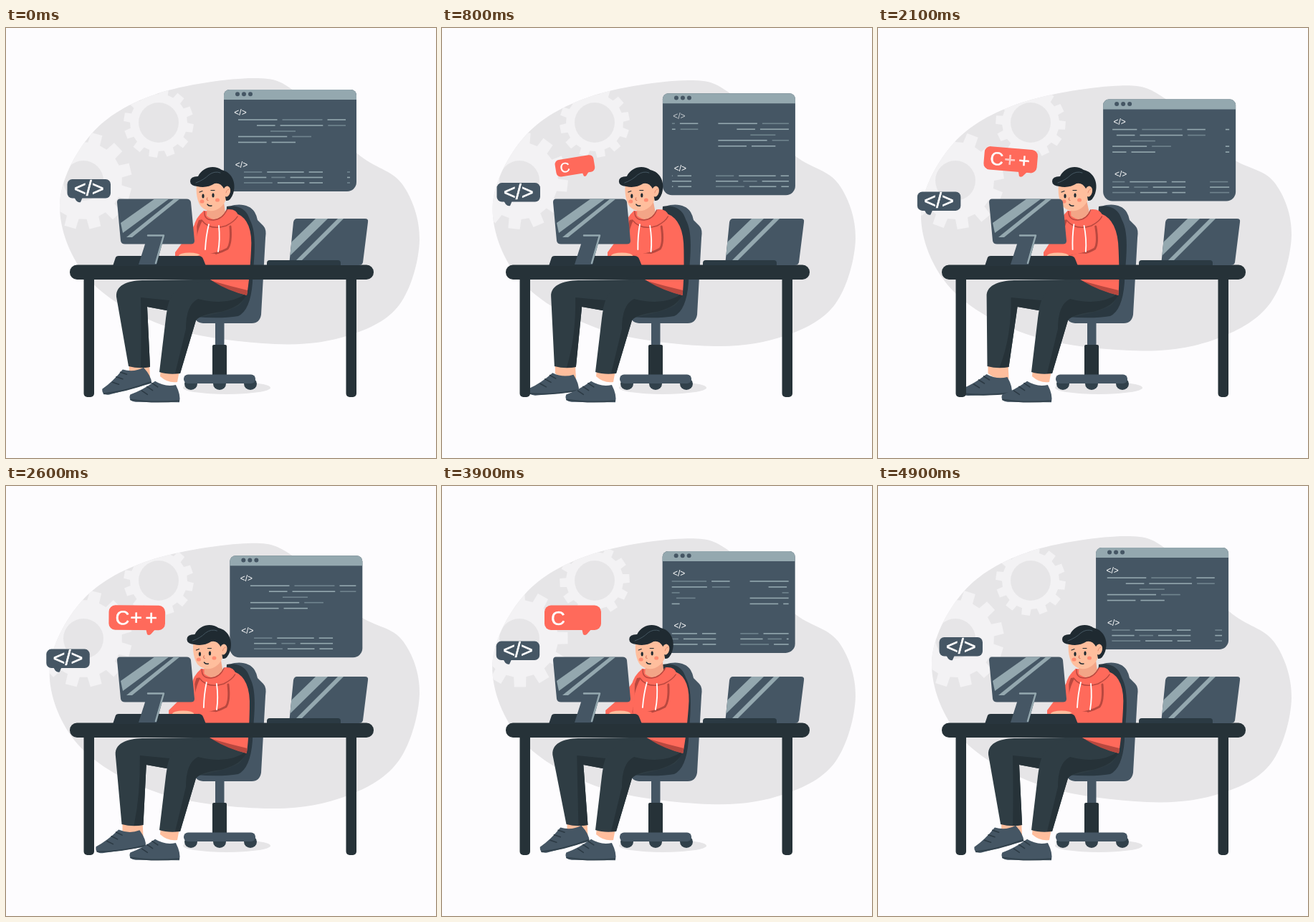
An HTML page with a canvas that plays this animation: 600 by 600 pixels, repeating every 5 s.

```html
<!DOCTYPE html>
<html lang="en">
<head>
<meta charset="utf-8">
<title>Developer at a desk</title>
<style>
html, body { margin: 0; width: 100%; height: 100%; overflow: hidden; background: #fdfcfe; }
canvas { display: block; width: 600px; height: 600px; }
</style>
</head>
<body>
<canvas id="stage" width="600" height="600"></canvas>
<script>
const ctx = document.getElementById('stage').getContext('2d');
const LOOP = 5000, STEP = 100;
const BG = '#fdfcfe', BLOB = '#e6e5e7', GEAR = '#f3f2f4';
const SLATE = '#455664', DARK = '#263238', MID = '#2f3d44', PALE = '#94a8af';
const RED = '#ff6a5b', RED_DARK = '#b9483f', SKIN = '#ffbe9d', HAIR = '#1f2a31';
const FONT = '"Liberation Sans", Arial, sans-serif';

// Progress from 0 at time a to 1 at time b.
const ramp = (t, a, b) => Math.min(1, Math.max(0, (t - a) / (b - a)));
const ease = k => (1 - Math.cos(Math.PI * k)) / 2;
const drift = t => ease(ramp(t, 0, 2200)) - ease(ramp(t, 2200, 4950));

function fill(d, color) {
  ctx.fillStyle = color;
  ctx.fill(typeof d === 'string' ? new Path2D(d) : d);
}

function line(d, color, width) {
  ctx.strokeStyle = color;
  ctx.lineWidth = width;
  ctx.lineCap = ctx.lineJoin = 'round';
  ctx.stroke(new Path2D(d));
}

function box(x, y, w, h, r, color) {
  ctx.beginPath();
  ctx.roundRect(x, y, w, h, r);
  ctx.fillStyle = color;
  ctx.fill();
}

function oval(x, y, rx, ry, color, turn = 0) {
  ctx.beginPath();
  ctx.ellipse(x, y, rx, ry, turn, 0, 7);
  ctx.fillStyle = color;
  ctx.fill();
}

function group(draw) {
  ctx.save();
  draw();
  ctx.restore();
}

function text(s, x, y, size, alpha = 1, weight = 0) {
  group(() => {
    ctx.globalAlpha = alpha;
    ctx.font = `${size}px ${FONT}`;
    ctx.textAlign = 'center';
    ctx.fillStyle = ctx.strokeStyle = '#fff';
    ctx.lineWidth = weight;
    ctx.fillText(s, x, y);
    if (weight) ctx.strokeText(s, x, y);
  });
}

// Closed smooth curve through a few points.
function smooth(points) {
  const path = new Path2D(), n = points.length;
  const at = i => points[(i + n) % n];
  path.moveTo(...at(0));
  for (let i = 0; i < n; i++) {
    const [a, b, c, d] = [at(i - 1), at(i), at(i + 1), at(i + 2)];
    path.bezierCurveTo(
      b[0] + (c[0] - a[0]) / 6, b[1] + (c[1] - a[1]) / 6,
      c[0] - (d[0] - b[0]) / 6, c[1] - (d[1] - b[1]) / 6, c[0], c[1]);
  }
  return path;
}

const EDGE = [[345, 70], [408, 92], [490, 175], [553, 218], [577, 296], [549, 386],
  [478, 429], [375, 441], [225, 417], [115, 350], [75, 247], [119, 148], [210, 92]];

function gear(cx, cy, outer, inner, hole, degrees) {
  const path = new Path2D(), pitch = Math.PI / 6;
  for (let i = 0; i < 12; i++) {
    const a = degrees * Math.PI / 180 + i * pitch;
    for (const [da, r] of [[-.16, inner], [-.12, outer], [.12, outer], [.16, inner]]) {
      path.lineTo(cx + r * Math.cos(a + da), cy + r * Math.sin(a + da));
    }
  }
  path.closePath();
  path.moveTo(cx + hole, cy);
  path.arc(cx, cy, hole, 0, 7);
  ctx.fillStyle = GEAR;
  ctx.fill(path, 'evenodd');
}

function backdrop(t) {
  const k = drift(t), turn = 60 * t / LOOP;
  const blob = smooth(EDGE.map(([x, y]) =>
    [x - k * .03 * (577 - x), y + k * 13 * (1 - (x / 520) ** 4)]));
  fill(blob, BLOB);
  group(() => {
    ctx.clip(blob);
    gear(213, 132, 49, 40, 28, turn + 9.5);
    gear(108, 213, 68, 54, 28, 16 - turn);
  });
}

// One row of code: bars of seeded length between two ends.
function codeRow(y, from, to, bars, shift, period) {
  const gap = 7, room = to - from - gap * (bars - 1);
  const size = i => 1 + .5 * Math.sin(y * 3 + i * 2.4);
  let total = 0, x = from;
  for (let i = 0; i < bars; i++) total += size(i);
  for (let i = 0; i < bars; i++) {
    const w = room * size(i) / total;
    ctx.fillStyle = (i + Math.round(y)) % 3 === 1 ? '#70848e' : PALE;
    for (let n = -2; n < 2; n++) ctx.fillRect(x + shift + n * period, y - .8, w, 1.6);
    x += w + gap;
  }
}

function codeWindow(t) {
  const k = ramp(t, 0, 2080) - ramp(t, 2080, 4920);
  group(() => {
    ctx.translate(304 + 10.2 * k, 86 + 13.7 * k);
    box(0, 0, 185, 142, [8, 8, 13, 13], SLATE);
    box(0, 0, 185, 14, [8, 8, 0, 0], PALE);
    for (let i = 0; i < 3; i++) oval(19 + 9 * i, 6.3, 3, 3, SLATE);
    text('</>', 23, 35.5, 12, 1 - .4 * (ramp(t, 0, 400) - ramp(t, 400, 2100)));
    text('</>', 24.5, 108.5, 12);
    ctx.beginPath();
    ctx.rect(13, 20, 163, 120);
    ctx.clip();
    const top = (...row) => codeRow(...row, t * 356 / 4960 % 178, 178);
    top(42, 20, 170, 3);
    top(50, 46, 170, 3);
    top(58, 65, 100, 1);
    top(65.5, 20, 122, 2);
    top(73.5, 20, 100, 2);
    for (let i = 0; i < 3; i++) {
      codeRow(115 + 7.5 * i, 28, 138, 3, t * 288 / LOOP % 144, 144);
    }
  });
}

function tagBubble(t) {
  const k = drift(t);
  group(() => {
    ctx.translate(-30.8 * k, 17.5 * k);
    box(85.5, 211, 60.5, 26.5, 7, SLATE);
    fill('M95 236 L98 241 Q101 244 104 243 L107 236 Z', SLATE);
    text('</>', 115.7, 233.5, 29, 1, .6);
  });
}

function langBubble(t) {
  const size = ramp(t, 390, 1050) - ramp(t, 4200, 4600);
  if (!size) return;
  // Fading swing after the pop-in.
  const swing = Math.cos(Math.PI * ramp(t, 1300, 3100) * 2) * (1 - ramp(t, 1300, 3100));
  group(() => {
    ctx.translate(199, 205);
    ctx.rotate(-.16 * swing);
    ctx.scale(size * (1 + .11 * swing), size * (1 + .11 * swing));
    ctx.translate(-199, -205);
    box(143, 166.5, 79, 34.5, 9, RED);
    fill('M195 199 L197 207 Q199 209 202 207 L209 199 Z', RED);
    text('C', 162, 193.5, 27.5, 1, .5);
    text('+', 181.5, 193.5, 29, ramp(t, 1600, 2400) - ramp(t, 3300, 3700), .5);
    text('+', 202.5, 193.5, 29, ramp(t, 1100, 1700) - ramp(t, 2800, 3300), .5);
  });
}

function chair() {
  oval(308, 502, 61, 9, BLOB);
  fill('M312 249 C326 244 341 247 347 257 Q350 262 351 268 L359 276 Q364 281 362 293 L356 400 Q354 412 343 412 L275 412 Q262 410 265 402 Z', SLATE);
  fill('M308 249 C329 246 337 257 340 267 C352 288 345 328 344 355 Q341 394 324 402 Q300 406 264 403 L300 370 Z', '#2a3841');
  box(292, 411, 12.5, 36, 0, SLATE);
  box(288, 442, 20, 45, 2, DARK);
  for (const x of [258, 298, 341]) oval(x, 496.5, 9, 8.5, '#31414b');
  box(248, 483.5, 100, 12.5, 6, SLATE);
}

// Shoe with its toe tip at the given point.
function shoe(x, y, turn) {
  group(() => {
    ctx.translate(x, y);
    ctx.rotate(turn);
    fill('M32 -28 Q46 -20 61 -24 Q69 -10 67 0 L6 2 Q-5 1 -2 -8 Q14 -14 32 -28 Z', SLATE);
    line('M-1 -1 Q30 3 66 -2', '#33434e', 2);
    line('M21 -20 L29 -15 M28 -25 L36 -20 M14 -14 L22 -9', '#2c3a44', 1.5);
  });
}

function legs(t) {
  const foot = -18.5 * ramp(t, 0, 1050) + 21 * ramp(t, 2300, 3000) - 2.5 * ramp(t, 3900, 4950);
  const knee = foot * .13, ax = 186 + foot;
  fill(`M${ax - 14} 468 L${ax + 14} 468 L${ax + 15} 489 Q${ax} 493 ${ax - 14} 482 Z`, SKIN);
  shoe(138 + foot, 511, -.23 * Math.min(1, 1 + foot / 18.5));
  fill(`M${154 + knee} 375 C${153 + knee} 357 173 352 194 352 L330 350 Q343 372 324 388
    Q298 400 262 404 L229 395 L${197 + knee} 389 L${ax + 15} 473 Q${ax} 476 ${ax - 15} 472 Z`, MID);
  fill(`M${188 + knee} 376 Q${189 + knee} 430 ${ax + 2} 474 L${ax + 15} 473 L${197 + knee} 389 L224 394 L228 380 Z`, DARK);
  fill('M216 476 L242 478 L239 494 Q226 496 215 486 Z', SKIN);
  shoe(175, 519.5, .04);
  fill('M234 370 Q226 380 223 405 L214 480 Q226 484 243 482 L265 408 Q270 400 300 396 Q331 388 336 370 L310 352 L255 356 Z', MID);
  fill('M268 378 Q251 386 251 420 L236 482 L243 482 L265 408 Q270 400 300 396 Q331 388 336 370 Q310 389 268 378 Z', DARK);
}

function torso(lean, hand) {
  group(() => {
    const k = lean / 155;
    ctx.transform(1, 0, -k, 1, 380 * k, 0);
    fill('M276 255 Q264 265 262 278 L254 335 L283 350 Q310 366 336 373 Q340 350 342 310 Q345 268 322 259 Z', RED);
    fill('M269 268 Q262 285 262 309 L265 320 Q262 290 275 267 Z', RED_DARK);
    line('M313 277 Q315 300 309 308 Q297 315 271 319', RED_DARK, 3);
    fill('M288 353 Q312 360 337 366 L336 373 Q310 367 288 353 Z', RED_DARK);
    fill('M281 243 L304 243 L306 258 Q294 274 280 262 Z', '#f3a587');
    fill('M276 254 Q273 270 288 270 Q303 269 309 253 Q322 252 324 262 Q311 278 289 278 Q273 276 272 264 Z', RED);
    line('M277 256 Q276 268 289 268 Q302 267 308 254', RED_DARK, 1.5);
    line('M273 268 Q284 283 307 276 Q319 270 323 263', RED_DARK, 1.5);
    line('M283 274 Q279 290 278 309 M297 276 Q299 295 296 312', '#fff', 1.8);
  });
  fill(`M${266 + lean * .7} 270 Q${253 + lean * .5} 291 ${hand} 313 L${hand} 321 L264 321 L${267 + lean * .4} 300 Z`, RED);
  oval(hand + 20, 318, 15, 4.5, SKIN);
  fill('M264 320 Q275 313 292 315 L300 330 L266 328 Z', RED);
}

function head(lean) {
  group(() => {
    ctx.translate(lean, 0);
    fill('M266 216 Q264 238 272 249 Q281 258 293 254 Q307 248 309 230 L306 208 L270 210 Z', SKIN);
    fill('M257 214 Q257 207 268 207 C275 193 291 191 301 198 C315 201 322 216 317 231 Q313 242 307 241 L304 224 Q299 215 291 217 Q280 224 267 221 Q257 220 257 214 Z', HAIR);
    line('M265 216 Q276 212 283 205 Q291 199 299 202', '#455762', 1);
    oval(308, 228, 5, 7.5, SKIN, .2);
    line('M307 230 Q308 225 311 225', '#e58f74', 1);
    oval(275, 234.5, 1.6, 3, HAIR);
    oval(289, 233.5, 1.6, 3, HAIR);
    line('M270 229 L274 227.5 M286 226.5 L291 226.5', HAIR, 1.2);
    oval(273.5, 242, 3, 2.6, '#ff8c72');
    oval(295, 240, 3, 2.6, '#ff8c72');
    line('M281 237 Q279 240 282 240.5', '#d9775e', 1.2);
    line('M281 246 Q283 249 287 248', HAIR, 1.4);
  });
}

function person(t) {
  const lean = -14 * ramp(t, 0, 1100) + 22 * ramp(t, 2300, 3000) - 8 * ramp(t, 3000, 4900);
  const hand = 236 - 5 * ramp(t, 0, 400) - 9 * ramp(t, 2300, 3000) + 14 * ramp(t, 3100, 4900);
  legs(t);
  torso(lean, hand);
  head(lean);
}

function screen(shape, wide, thin) {
  fill(shape, SLATE);
  group(() => {
    ctx.clip(new Path2D(shape));
    fill(wide, PALE);
    fill(thin, PALE);
  });
}

function desk() {
  box(108.5, 340, 14.5, 175, 5, DARK);
  box(474.5, 340, 14.5, 175, 5, DARK);
  box(89, 330.5, 424, 20.5, 10, DARK);
  screen('M406 266 L501 266 Q506 266 505 271 L498 327 Q497 331 492 331 L395 331 L401 271 Q402 266 406 266 Z',
    'M432 266 L449 266 L396 318 L398 299 Z', 'M463 266 L471 266 L408 329 L400 329 Z');
  box(364, 324, 103, 7, [4, 4, 0, 0], '#2b3a43');
}

function workstation() {
  fill('M153 320 Q154 318 157 318 L269 318 Q273 318 275 322 L279 332 L149 332 Z', '#28353d');
  screen('M159 238.5 L252 238.5 Q257 238.5 258 243 L263 297 Q263 301.5 258 301.5 L166 301.5 Q161 301.5 160 297 L155 243 Q155 238.5 159 238.5 Z',
    'M208 238 L228 238 L163 286 L160 272 Z', 'M235 238 L243 238 L176 292 L168 292 Z');
  fill('M198 289 L221 289 L210 330 L185 330 Z', SLATE);
  line('M198 289.5 L220 289.5 L209 328', PALE, 2.5);
}

function draw(t) {
  ctx.fillStyle = BG;
  ctx.fillRect(0, 0, 600, 600);
  backdrop(t);
  codeWindow(t);
  tagBubble(t);
  langBubble(t);
  chair();
  person(t);
  desk();
  workstation();
}

const start = performance.now();
function tick() {
  const t = (performance.now() - start) % LOOP;
  draw(Math.floor(t / STEP) * STEP);
  requestAnimationFrame(tick);
}
tick();
</script>
</body>
</html>
```
